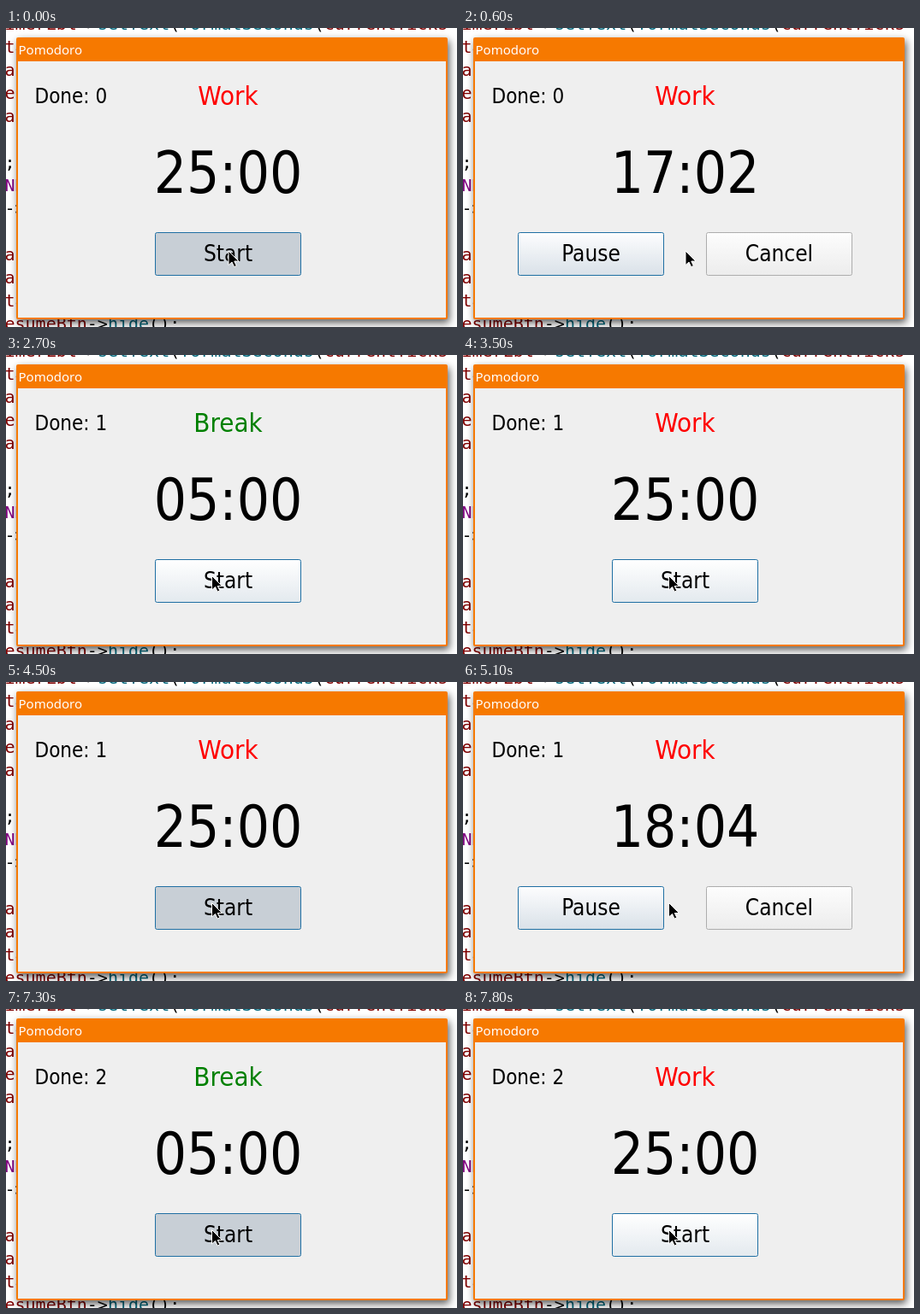
These frames come from a looping animation (527 px wide and 350 px high, 8 s). An HTML page:

```html
<!DOCTYPE html>
<html lang="en">
<head>
<meta charset="utf-8">
<title>Pomodoro</title>
<style>
  html, body { margin: 0; width: 100%; height: 100%; overflow: hidden; background: #fff; }
  svg { display: block; }
  text { font-family: "DejaVu Sans Condensed", "DejaVu Sans", sans-serif; font-stretch: condensed; white-space: pre; }
  .mid { text-anchor: middle; }
  .btn text { font-size: 26px; text-anchor: middle; }
  .btn rect { stroke: #1f6fa3; }
  #code text { font: 20px "DejaVu Sans Mono", monospace; }
  .field { fill: #800000; }
  .fn { fill: #00677c; }
  .macro { fill: #800080; }
  #win { filter: drop-shadow(2px 4px 5px rgba(0, 0, 0, .65)); }
</style>
</head>
<body>
<svg width="527" height="350" viewBox="0 0 527 350">
  <defs>
    <linearGradient id="focus" x2="0" y2="1"><stop stop-color="#fdfdfe"/><stop offset="1" stop-color="#d9e1e8"/></linearGradient>
    <linearGradient id="hover" x2="0" y2="1"><stop stop-color="#fff"/><stop offset="1" stop-color="#e3e9ee"/></linearGradient>
    <linearGradient id="plain" x2="0" y2="1"><stop stop-color="#fdfdfd"/><stop offset="1" stop-color="#ececec"/></linearGradient>
  </defs>
  <g id="code"></g>
  <g id="win">
    <rect x="12" y="11" width="504" height="330" rx="2" fill="#f67900"/>
    <rect x="14" y="39" width="500" height="300" fill="#efefef"/>
  </g>
  <text x="14.5" y="31" fill="#fff" style="font:15px 'Noto Sans',sans-serif">Pomodoro</text>
  <text id="done" x="33.5" y="88" font-size="24"></text>
  <text id="mode" class="mid" x="259.5" y="90" font-size="31"></text>
  <text id="clock" class="mid" x="259.5" y="193" font-size="67"></text>
  <g id="idle" class="btn">
    <rect id="start" x="174.5" y="239.5" width="170" height="50" rx="2"/>
    <text x="259.5" y="273">Start</text>
  </g>
  <g id="running" class="btn">
    <rect x="64.5" y="239.5" width="170" height="50" rx="2" fill="url(#focus)"/>
    <text x="149.5" y="273">Pause</text>
    <rect x="284.5" y="239.5" width="170" height="50" rx="2" fill="url(#plain)" style="stroke:#adadad"/>
    <text x="369.5" y="273">Cancel</text>
  </g>
  <path id="cursor" d="M0 0V16.5L4 13 6.6 18.6 9.4 17.4 6.8 12H12Z" stroke="#fff" stroke-width="1"/>
</svg>
<script>
const el = id => document.getElementById(id);

// Editor text behind the window: [line, html]
const lines = [
  [0, '<tspan class="field">imerLbl</tspan>-><tspan class="fn">setText</tspan>(<tspan class="fn">formatSeconds</tspan>(<tspan class="field">currentTicks</tspan>'],
  ...[[1, 'ta'], [2, 'au'], [3, 'es'], [4, 'an'], [10, 'au'], [11, 'an'], [12, 'ta']]
    .map(([n, s]) => [n, `<tspan class="field">${s}</tspan>`]),
  [6, ';'],
  [7, '<tspan class="macro">NN</tspan>'],
  [8, '->'],
  [13, '<tspan class="field">esumeBtn</tspan>-><tspan class="fn">hide</tspan>();']
];
el('code').innerHTML = lines
  .map(([n, s]) => `<text x="-1.5" y="${2 + 27 * n}">${s.replace(/->/g, '-&gt;')}</text>`).join('');

const LOOP = 8000, STEP = 100;
const WORK = 1500, REST = 300;

// start time, session length, finished rounds, button fill (null while running), seconds at start, seconds per ms
const phases = [
  [0, WORK, 0, '#c8cfd6', WORK, 0],
  [100, WORK, 0, null, 1434.5, .825],
  [1900, REST, 1, 'url(#focus)', REST, 0],
  [2700, REST, 1, 'url(#hover)', REST, 0],
  [3000, REST, 1, '#c8cfd6', REST, 0],
  [3100, REST, 1, null, 280, .783],
  [3500, WORK, 1, 'url(#hover)', WORK, 0],
  [4500, WORK, 1, '#c8cfd6', WORK, 0],
  [4600, WORK, 1, null, 1475.5, .783],
  [6500, REST, 2, 'url(#hover)', REST, 0],
  [7300, REST, 2, '#c8cfd6', REST, 0],
  [7400, REST, 2, null, 280, .783],
  [7800, WORK, 2, 'url(#hover)', WORK, 0]
];

// Pointer path: time, x, y
const path = [[0, 260, 261], [1000, 260, 261], [1400, 226, 78], [1600, 222, 90],
  [2000, 237, 219], [2699, 237, 219], [2700, 240.5, 258.5], [LOOP, 240.5, 258.5]];

function pointer(t) {
  const i = path.findIndex(p => p[0] > t);
  const [t0, x0, y0] = path[i - 1], [t1, x1, y1] = path[i];
  const k = (t - t0) / (t1 - t0);
  return `translate(${Math.round(2 * (x0 + (x1 - x0) * k)) / 2} ${Math.round(2 * (y0 + (y1 - y0) * k)) / 2})`;
}

const pad = n => String(n).padStart(2, '0');

function draw(now) {
  const t = Math.floor(now % LOOP / STEP) * STEP;
  const [begin, session, rounds, fill, from, rate] = phases.findLast(p => p[0] <= t);
  const left = Math.round(from - (t - begin) * rate);
  el('done').textContent = 'Done: ' + rounds;
  el('mode').textContent = session === WORK ? 'Work' : 'Break';
  el('mode').setAttribute('fill', session === WORK ? '#f00' : '#008000');
  el('clock').textContent = pad(Math.floor(left / 60)) + ':' + pad(left % 60);
  el('idle').style.display = fill ? '' : 'none';
  el('running').style.display = fill ? 'none' : '';
  if (fill) el('start').setAttribute('fill', fill);
  el('cursor').setAttribute('transform', pointer(t));
}

const origin = performance.now();
function tick() {
  draw(performance.now() - origin);
  requestAnimationFrame(tick);
}
tick();
</script>
</body>
</html>
```
